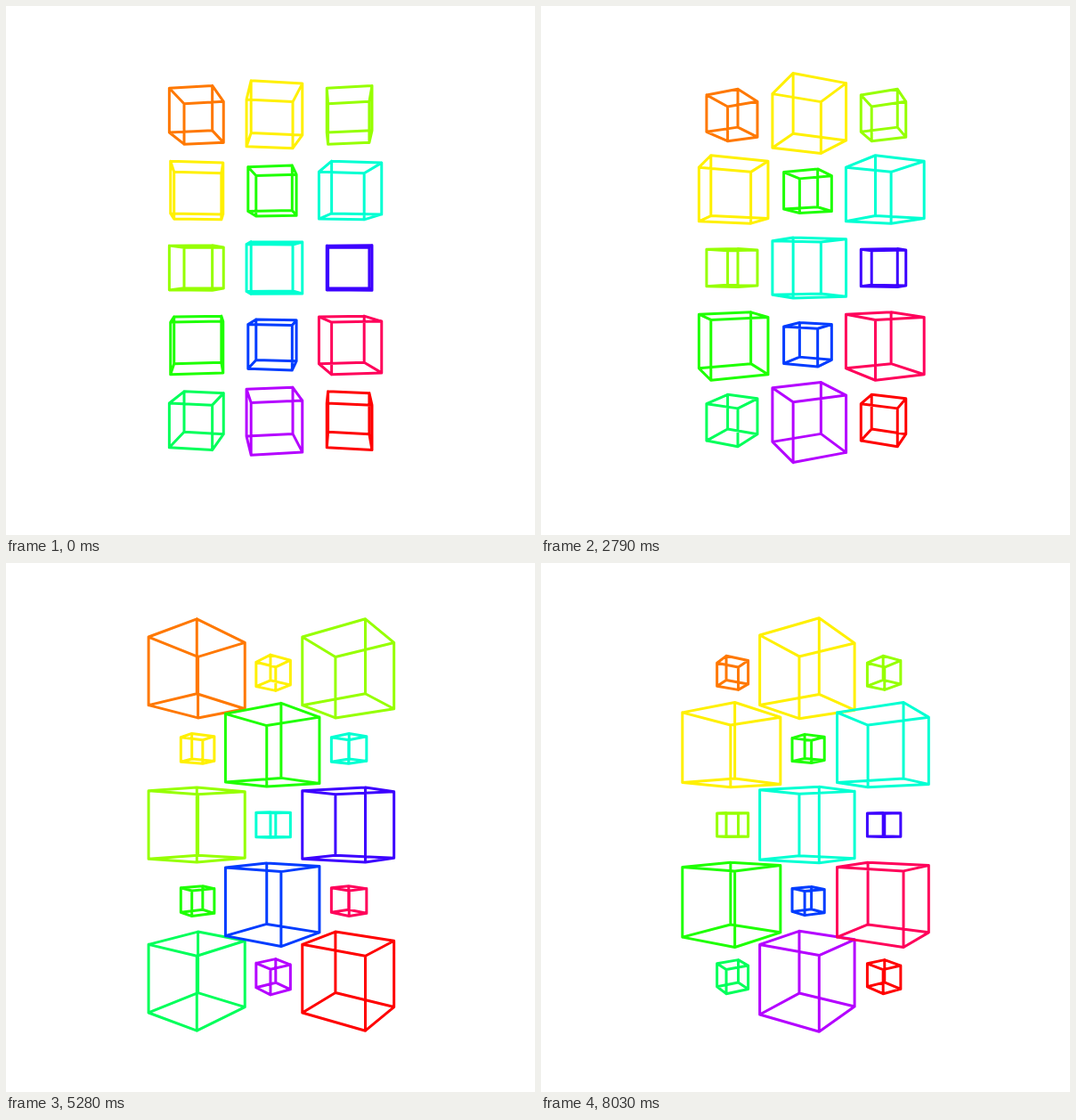
Recreate the animation shown at these times as an HTML page with a canvas. Size 594 by 594 pixels, loop 8130 ms.

```html
<!DOCTYPE html>
<html lang="en">
<head>
<meta charset="utf-8">
<title>Cube grid</title>
<style>
  html, body { margin: 0; width: 100%; height: 100%; overflow: hidden; background: #fff; }
  canvas { display: block; }
</style>
</head>
<body>
<canvas id="stage" width="594" height="594"></canvas>
<script>
const ctx = document.getElementById('stage').getContext('2d');
const LOOP = 8130, STEP = 34;
const CX = 300, CY = 294, DEPTH = 519.6;
const COLS = 3, ROWS = 5, GAP = 85;
const SIZE = 51.5, SWELL = 25.6;

// [time in ms, phase in radians]; the phase advances almost evenly
const KEYS = [
  [0, 0.145], [750, 0.850], [2120, 2.086], [3420, 3.317],
  [4260, 4.074], [6090, 5.872], [8030, 7.715]
];

// Phase at time t, advanced in small even ticks
function phaseAt(t) {
  for (let k = 1; k < KEYS.length; k++) {
    const [t0, p0] = KEYS[k - 1], [t1, p1] = KEYS[k];
    if (t >= t1) continue;
    const ticks = Math.round((t1 - t0) / STEP);
    const u = Math.floor((t - t0) / (t1 - t0) * ticks + 1e-6) / ticks;
    return p0 + (p1 - p0) * u;
  }
  return KEYS[KEYS.length - 1][1];
}

function project(x, y, z) {
  const s = DEPTH / (DEPTH - z);
  return [CX + x * s, CY + y * s];
}

function line(a, b) {
  ctx.moveTo(a[0], a[1]);
  ctx.lineTo(b[0], b[1]);
}

function cube(x, y, size, angle, color) {
  const h = size / 2, c = Math.cos(angle) * h, s = Math.sin(angle) * h;
  const corners = [[-1, 1], [1, 1], [1, -1], [-1, -1]];
  const ring = dy => corners.map(([a, b]) =>
    project(x + a * c + b * s, y + dy, b * c - a * s));
  const top = ring(-h), bottom = ring(h);
  ctx.strokeStyle = color;
  ctx.beginPath();
  for (let k = 0; k < 4; k++) {
    const n = (k + 1) % 4;
    line(top[k], top[n]);
    line(bottom[k], bottom[n]);
    line(top[k], bottom[k]);
  }
  ctx.stroke();
}

function draw(t) {
  const wave = Math.sin(phaseAt(t));
  ctx.fillStyle = '#fff';
  ctx.fillRect(0, 0, 594, 594);
  ctx.lineWidth = 3;
  ctx.lineCap = ctx.lineJoin = 'round';
  for (let i = 0; i < COLS; i++) {
    for (let j = 0; j < ROWS; j++) {
      const w = (i + j) % 2 ? wave : -wave;
      const hue = Math.min(255, (i + 1) * (j + 1) * 20) / 255 * 360;
      cube((i - 1) * GAP, (j - 2) * GAP, SIZE + SWELL * w, w, `hsl(${hue}, 100%, 50%)`);
    }
  }
}

const start = performance.now();
function tick() {
  draw((performance.now() - start) % LOOP);
  requestAnimationFrame(tick);
}
tick();
</script>
</body>
</html>
```
